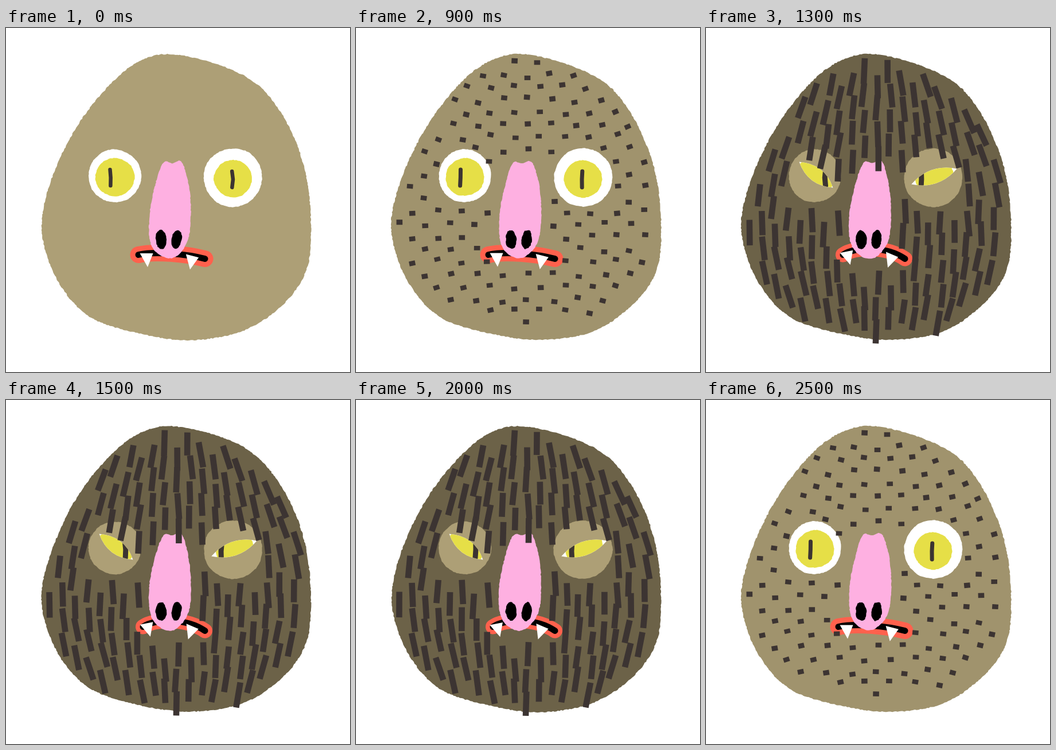
An HTML page with a canvas that plays this animation: 600 by 600 pixels, repeating every 2600 ms.

```html
<!DOCTYPE html>
<html lang="en">
<head>
<meta charset="utf-8">
<title>Hairy face</title>
<style>
html, body { margin: 0; width: 100%; height: 100%; overflow: hidden; background: #fff; }
canvas { display: block; }
</style>
</head>
<body>
<canvas id="stage" width="600" height="600"></canvas>
<script>
const ctx = document.getElementById('stage').getContext('2d');
const STEP = 100, STEPS = 26, HAIR_LENGTH = 42;
const OLIVE = [173, 159, 118], SHADE = [108, 98, 72];
const HAIR = '#3c3432', RED = '#ff614d', PINK = '#feb0e1', YELLOW = '#e6df47';

const FACE = [
  [296, 46], [385, 69], [448, 108], [497, 180], [524, 265], [532, 365], [520, 432],
  [478, 487], [410, 530], [320, 544], [235, 533], [150, 506], [98, 455], [68, 388],
  [63, 325], [86, 245], [129, 163], [187, 92], [240, 55]
];
const NOSE = [
  [275, 235], [290, 236], [308, 236], [322, 297], [318, 370],
  [288, 402], [255, 382], [250, 328], [263, 264]
];
const EYES = [
  { x: 190, y: 258, r: 46, iris: 34, pupil: 182, shift: 26, tilt: 0.65 },
  { x: 396, y: 261, r: 51, iris: 33.5, pupil: 395, shift: -19, tilt: -0.33 }
];

const mix = (a, b, t) => a + (b - a) * t;

function seeded(s) {
  return () => {
    s = (s * 1664525 + 1013904223) >>> 0;
    return s / 2147483648 - 1;
  };
}

// Closed Catmull-Rom outline with a rough crayon edge.
function outline(pts, rnd = () => 0, rough = 0.6) {
  const p = pts.map(([x, y]) => [x + rnd() * 0.7, y + rnd() * 0.7]);
  const n = p.length, path = new Path2D();
  for (let i = 0; i < n; i++) {
    const a = p[(i + n - 1) % n], b = p[i], c = p[(i + 1) % n], d = p[(i + 2) % n];
    const parts = Math.ceil(Math.hypot(c[0] - b[0], c[1] - b[1]) / 3);
    for (let j = 0; j < parts; j++) {
      const u = j / parts;
      const at = k => b[k] + 0.5 * u * (c[k] - a[k]
        + u * (2 * a[k] - 5 * b[k] + 4 * c[k] - d[k] + u * (3 * (b[k] - c[k]) + d[k] - a[k])));
      path.lineTo(at(0) + rnd() * rough, at(1) + rnd() * rough);
    }
  }
  path.closePath();
  return path;
}

function blob(pts, rnd, color, rough) {
  ctx.fillStyle = color;
  ctx.fill(outline(pts, rnd, rough));
}

function oval(x, y, rx, ry, rnd, color, turn = 0) {
  const c = Math.cos(turn), s = Math.sin(turn);
  const pts = Array.from({ length: 12 }, (_, i) => {
    const u = rx * Math.cos(i * Math.PI / 6), v = ry * Math.sin(i * Math.PI / 6);
    return [x + u * c - v * s, y + u * s + v * c];
  });
  blob(pts, rnd, color, 0.5);
}

// Staggered columns that spread from the crown, leaving the features free.
function plantHair() {
  const rnd = seeded(7), face = outline(FACE), hairs = [];
  const inFace = (x, y) => ctx.isPointInPath(face, x, y);
  const taken = (x, y) =>
    EYES.some(e => Math.hypot(x - e.x, y - e.y) < e.r + 3) ||
    (Math.abs(x - 287) < 42 && y > 226 && y < 402) ||
    (Math.abs(x - 293) < 70 && y > 346 && y < 408);
  for (let j = -11; j <= 11; j++) {
    for (let y0 = j % 2 ? 59 : 82; y0 < 530; y0 += 43.5) {
      const crown = Math.max(0, (300 - y0) / 250);
      const x = 299 + 22.5 * j * (1 - 0.15 * crown * crown) + rnd() * 3;
      const y = y0 + rnd() * 5;
      const inset = inFace(297 + (x - 297) / 0.96, 300 + (y - 300) / 0.96);
      if (!inset || !inFace(x, y + 27) || taken(x, y)) continue;
      const lean = (300 - x) * (330 - y) * 1.3e-5 + rnd() * 0.08;
      hairs.push({ x, y, lean, size: HAIR_LENGTH + rnd() * 3 });
    }
  }
  return hairs;
}
const hairs = plantHair();

// Almond opening that narrows as the hair grows.
function clipLid(eye, t) {
  const half = eye.r - 9 * Math.max(0, t - 0.8) / 0.2;
  const h = 92 - 113 * (t - 0.4);
  const lid = new Path2D();
  lid.moveTo(-half, 0);
  lid.quadraticCurveTo(0, h, half, 0);
  lid.quadraticCurveTo(0, -h, -half, 0);
  const placed = new Path2D();
  placed.addPath(lid, new DOMMatrix().translate(eye.x + 2, eye.y - 2).rotate(eye.tilt * 180 / Math.PI));
  ctx.clip(placed);
}

function drawEye(eye, t, rnd) {
  const { x, y, r, iris, pupil, shift } = eye;
  const shut = t > 0.3, look = shut ? t : 0;
  ctx.save();
  if (shut) {
    oval(x, y, r, r, rnd, `rgb(${OLIVE})`);
    clipLid(eye, t);
  }
  oval(x, y, r, r, rnd, '#fff');
  oval(x + 2 * look, y + 2 - 4 * look, iris, iris - 1, rnd, YELLOW);
  const px = pupil + shift * look;
  ctx.beginPath();
  for (const dy of [-14, 0, 14]) ctx.lineTo(px + rnd(), y + 3 + dy);
  ctx.lineWidth = mix(6.5, 9, t);
  ctx.lineCap = ctx.lineJoin = 'round';
  ctx.strokeStyle = HAIR;
  ctx.stroke();
  ctx.restore();
}

function drawTooth(x, y, tilt, rnd) {
  ctx.save();
  ctx.translate(x + rnd() * 0.5, y + rnd() * 0.5);
  ctx.rotate(tilt);
  ctx.beginPath();
  ctx.moveTo(-11.5, 0);
  ctx.lineTo(11.5, 0);
  ctx.lineTo(2, 24);
  ctx.fillStyle = '#fff';
  ctx.fill();
  ctx.restore();
}

function drawLips(bend) {
  ctx.beginPath();
  ctx.moveTo(mix(231, 239, bend), 395.5);
  ctx.bezierCurveTo(260, mix(389, 381, bend), 314, mix(394, 380, bend), 347, 402.5);
  ctx.lineCap = 'round';
  for (const [color, width] of [[RED, mix(29, 26, bend)], ['#000', 11]]) {
    ctx.strokeStyle = color;
    ctx.lineWidth = width;
    ctx.stroke();
  }
}

function drawHair(t, rnd) {
  ctx.fillStyle = HAIR;
  for (const { x, y, lean, size } of hairs) {
    ctx.save();
    ctx.translate(x + rnd() * 0.6, y - 4 + rnd() * 0.6);
    ctx.rotate(lean + rnd() * 0.02);
    ctx.fillRect(-5.3, 0, 10.6, size * t);
    ctx.restore();
  }
}

// Bald, then five steps of growth, a hold, and the same steps back.
function growth(k) {
  return k < 9 ? 0 : Math.min(1, (k - 8) / 5, (STEPS - k) / 5);
}

function draw(k) {
  const t = growth(k), bend = t > 0.3 ? t : 0;
  const rnd = seeded(50 + (k % 4) * 977);
  ctx.fillStyle = '#fff';
  ctx.fillRect(0, 0, 600, 600);
  const skin = OLIVE.map((c, i) => Math.round(mix(c, SHADE[i], t)));
  blob(FACE, rnd, `rgb(${skin})`, 0.8);
  for (const eye of EYES) drawEye(eye, t, rnd);
  drawLips(bend);
  blob(NOSE, rnd, PINK);
  oval(270.5, 369, 9.5, 16.5, rnd, '#000', -0.05);
  oval(297.5, 369, 8.8, 16.5, rnd, '#000', 0.13);
  drawTooth(245, 393 - 3 * bend, -0.2 * bend, rnd);
  drawTooth(325, 397 - 2 * bend, 0.25 + 0.15 * bend, rnd);
  if (t > 0) drawHair(t, rnd);
}

let start = null, shown = -1;
function tick(now) {
  if (start === null) start = now;
  const k = Math.floor((now - start) / STEP) % STEPS;
  if (k !== shown) draw(shown = k);
  requestAnimationFrame(tick);
}
draw(0);
requestAnimationFrame(tick);
</script>
</body>
</html>
```
